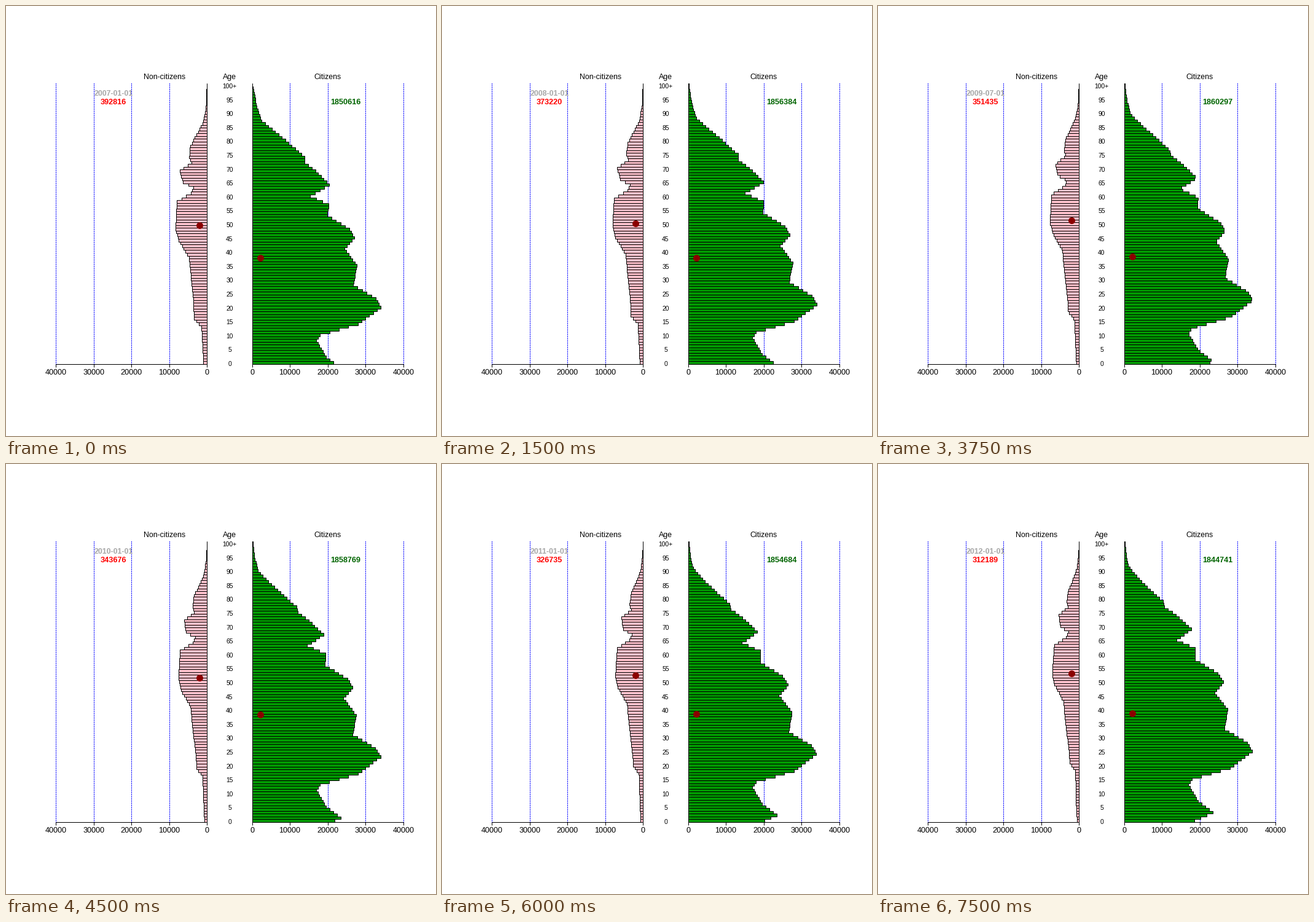
These frames come from a looping animation (700x700 px, 8 s). A matplotlib script:

```python
import numpy as np
import matplotlib.pyplot as plt
from matplotlib.animation import FuncAnimation

SIZE, DPI = 700, 100
PX = 72 / DPI
LEFT, RIGHT, BASE, TOP = 327, 401, 582, 125
TICK = 61.5          # pixels per 10000 people
AGES = np.arange(101)

# Turning points of each outline: (age at the start, bar length in pixels);
# negative ages are cohorts born during the loop
CITIZENS = [(-5, 114), (-2, 144), (2, 120), (8, 104), (10, 110), (14, 172),
            (20, 209), (23, 201), (28, 164), (35, 170), (41, 150), (45, 166),
            (48, 158), (53, 122), (57, 124), (60, 94), (64, 125), (69, 103),
            (72, 85), (74, 85), (80, 54), (87, 15), (92, 7), (100, 0.5)]
NONCITIZENS = [(-5, 3), (0, 5.5), (13, 9), (16, 21), (22, 22), (38, 29),
               (44, 46), (48, 51), (58, 49), (61, 26), (63, 22), (65, 39),
               (69, 44), (72, 25), (74, 29), (78, 27), (86, 7), (92, 1.5),
               (100, 0.2)]

# Counter values at the half-year steps
STEPS = [0, 1, 3, 5, 7, 8, 10]
NON_TOTAL = [392816, 381290, 365151, 351435, 335918, 326735, 312189]
CIT_TOTAL = [1850616, 1854146, 1858623, 1860297, 1857241, 1854684, 1844741]


def citizen_loss(age):
    return 0.0245 * np.exp(0.08 * (age - 65))


def noncitizen_loss(age):
    young = 0.05 * np.exp(-((age - 14) / 12) ** 2)
    return 0.025 + young + 0.03 * np.exp(0.075 * (age - 70))


def lengths(outline, loss, years):
    """Move every cohort up by some years and thin it out."""
    start = np.interp(AGES - years, *zip(*outline))
    lived = np.minimum(years, AGES)
    return start * np.exp(-lived * loss(AGES - lived / 2))


fig = plt.figure(figsize=(SIZE / DPI, SIZE / DPI), dpi=DPI, facecolor="white")
ax = fig.add_axes([0, 0, 1, 1])
ax.axis("off")


def label(x, y, text, size=12.4, color="black", weight="normal"):
    return ax.text(x, y, text, fontsize=size * PX, color=color, weight=weight,
                   family="Liberation Sans", ha="center", va="baseline")


def line(xs, ys, **style):
    ax.plot(xs, ys, lw=PX, solid_capstyle="butt", snap=True,
            **{"color": "black", "zorder": 3, **style})


def draw_axis(zero, direction):
    line([zero, zero + direction * 4 * TICK], [BASE, BASE])
    line([zero, zero], [TOP, BASE])
    for i in range(5):
        x = zero + direction * int(i * TICK)
        line([x, x], [BASE, BASE + 5])
        label(x, 598.5, str(i * 10000), 12.6)
        if i:
            line([x, x], [TOP, BASE], color="blue", ls=(0, (2, 2)),
                 zorder=1, antialiased=False)


def make_bars(zero, color):
    edges = np.round(BASE - (BASE - TOP) / 101 * np.arange(102))
    return ax.barh(edges[1:], np.ones(101), height=-np.diff(edges), left=zero,
                   align="edge", color=color, edgecolor="black",
                   linewidth=PX, zorder=2, snap=True)


draw_axis(LEFT, -1)
draw_axis(RIGHT, 1)
left_bars = make_bars(LEFT, "#ffc0cb")
right_bars = make_bars(RIGHT, "#009900")

label(258, 118, "Non-citizens")
label(363.5, 118, "Age")
label(524, 118, "Citizens")
for age in range(0, 101, 5):
    label(364, 585 - 4.52 * age, "100+" if age == 100 else str(age), 10.3)

date = label(175, 144.5, "", color="#a9a9a9", weight="bold")
non_total = label(175, 158.5, "", 12.6, "red", "bold")
cit_total = label(552.5, 158.5, "", 12.6, "#006400", "bold")
dots = [ax.plot([x], [0], "o", ms=11 * PX, mew=0, color="#8b0000", zorder=4)[0]
        for x in (315, 413.5)]

# Whole numbers fall on pixel centres once lines are snapped
ax.set_xlim(0, SIZE)
ax.set_ylim(SIZE - 1, -1)


def update(frame):
    step = frame // 3
    years = step / 2
    pink = lengths(NONCITIZENS, noncitizen_loss, years)
    green = lengths(CITIZENS, citizen_loss, years)
    for bar, size in zip(left_bars, pink):
        bar.set_width(-round(size))
    for bar, size in zip(right_bars, green):
        bar.set_width(round(size))
    date.set_text(f"{2007 + step // 2}-{'07' if step % 2 else '01'}-01")
    non_total.set_text(str(int(np.interp(step, STEPS, NON_TOTAL))))
    cit_total.set_text(str(int(np.interp(step, STEPS, CIT_TOTAL))))
    dots[0].set_ydata([356 - 1.58 * step])
    dots[1].set_ydata([409.3 - 0.4 * step])
    return [*left_bars, *right_bars, date, non_total, cit_total, *dots]


anim = FuncAnimation(fig, update, frames=32, interval=250, repeat=True,
                     repeat_delay=0, blit=False)
plt.show()
```
